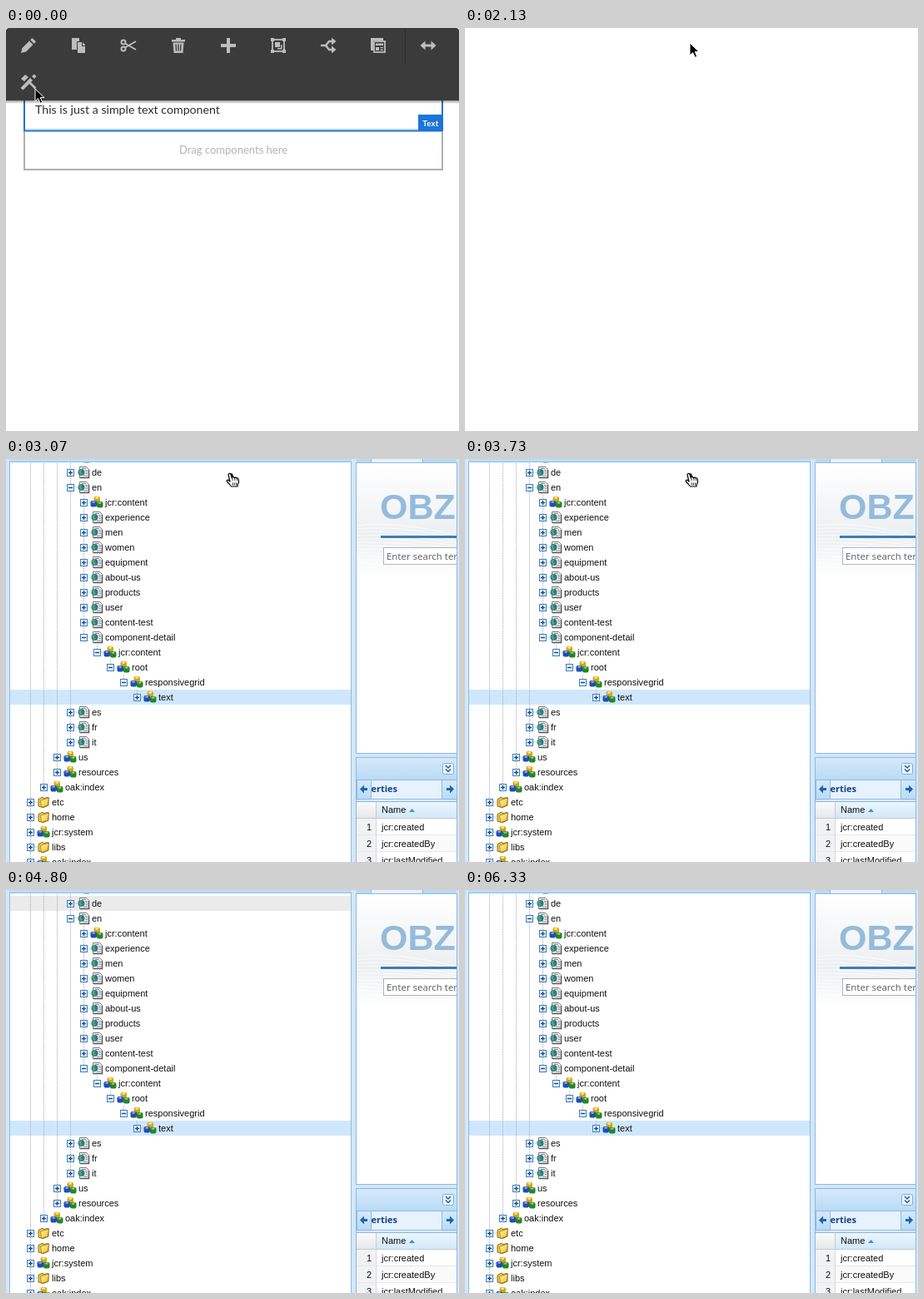
An HTML page that plays this animation: 544x484 px, repeating every 6.39 s.

```html
<!DOCTYPE html>
<html lang="en">
<head>
<meta charset="utf-8">
<title>Component to repository tree</title>
<style>
html, body { margin: 0; width: 100%; height: 100%; overflow: hidden; background: #fff; }
svg { display: block; width: 100vw; height: 100vh; }
text { font: 11px "Liberation Sans", Arial, sans-serif; fill: #111; white-space: pre; }
.page { font: 14.2px Lato, sans-serif; fill: #2c2c2c; }
.hint { font: 13px Lato, sans-serif; fill: #b3b3b3; text-anchor: middle; }
.badge { font: bold 9.5px Lato, sans-serif; fill: #fff; letter-spacing: .3px; text-anchor: middle; }
.load { font: 11.2px "Noto Sans", sans-serif; }
.brand { font: bold 43px "Liberation Sans", Arial, sans-serif; fill: #94bbdb; }
.search { font: 11.4px "Noto Sans", sans-serif; fill: #666; }
.tab { font: bold 11px "Noto Sans", sans-serif; fill: #15428b; }
.italic { font-style: italic; }
.line { fill: none; stroke: #8db9e2; }
.panel { fill: #fff; stroke: #8db9e2; }
.button { fill: url(#bar); stroke: #8db9e2; }
.dots { fill: none; stroke: #aaa; stroke-dasharray: 1 1; }
</style>
</head>
<body>
<svg viewBox="0 0 544 484" xmlns="http://www.w3.org/2000/svg">
  <defs>
    <clipPath id="treeClip"><rect x="5" y="4" width="409" height="480"/></clipPath>
    <linearGradient id="bar" x2="0" y2="1"><stop stop-color="#d6e9fa"/><stop offset="1" stop-color="#b9dbf5"/></linearGradient>
    <linearGradient id="head" x2="0" y2="1"><stop stop-color="#fafafa"/><stop offset="1" stop-color="#e6e8ea"/></linearGradient>
    <linearGradient id="sorted" x2="0" y2="1"><stop stop-color="#ecf6fe"/><stop offset="1" stop-color="#d2e8f9"/></linearGradient>
    <linearGradient id="haze" x2="0" y2="1"><stop stop-color="#fff"/><stop offset=".65" stop-color="#eceff1"/><stop offset="1" stop-color="#fff"/></linearGradient>
    <linearGradient id="shade" x2="0" y2="1"><stop stop-opacity=".4"/><stop offset="1" stop-opacity="0"/></linearGradient>
    <linearGradient id="gold" x2="1" y2="1"><stop stop-color="#fff3a4"/><stop offset="1" stop-color="#f0c02c"/></linearGradient>

    <g id="f" stroke-linejoin="round">
      <path d="M-6-3.500L-1-6 0-4.500 6-5.500V4L0 6.500-6 5z" fill="#f3cd45" stroke="#8a6a14"/>
      <path d="M-3.500-2L6.500-5 5 4 -2.500 6.500z" fill="url(#gold)" stroke="#8a6a14" stroke-width=".7"/>
    </g>
    <g id="c">
      <rect x="-3.500" y="-7" width="7.500" height="7.500" rx="2" fill="#d8a512"/>
      <path d="M-2.500-5l2-1.500h3L1-4z" fill="#fff09a"/>
      <rect x="-7.500" y="-2" width="7.500" height="7.500" rx="2" fill="#1f4fb0"/>
      <path d="M-6.500 0l2-1.500h3L-3 1z" fill="#86b5f2"/>
      <rect x="0" y="-1" width="7.500" height="7.500" rx="2" fill="#25852a"/>
      <path d="M1 1l2-1.500h3L4.500 2z" fill="#8bd67a"/>
    </g>
    <g id="p">
      <path d="M-4.500-6.500H3.500L6.500-3.500V6.500h-11z" fill="#f6f6f6" stroke="#777"/>
      <path d="M-4 6.500H6.500V-3" fill="none" stroke="#555" stroke-width="1.500"/>
      <path d="M-2-4.500h5M2-2.500h3M2.500-.500h2.500M2.500 1.500h2.500M0 4h5" stroke="#8a8a8a" fill="none"/>
      <circle cx="-2.500" cy="0" r="4" fill="#2a7796"/>
      <path d="M-5.500-1Q-4-4-2-3L-3 0-1 1-3 3.500Q-5 2-5.500-1z" fill="#54ab60"/>
    </g>
    <g id="busy"><circle r="5.500" fill="none" stroke="#9b8c76" stroke-width="3" stroke-dasharray="2.600 1.720"/></g>
    <g id="box"><rect x="-4" y="-4" width="8" height="8" fill="#e2f0fd" stroke="#3f7fbd"/><path d="M-2.500 0h5" stroke="#17457e" stroke-width="1.300"/></g>
  </defs>

  <g id="editor">
    <path d="M22 80V123.500H524V80" fill="none" stroke="#1f74cf" stroke-width="2"/>
    <path d="M23 121.500H523" stroke="#c9d3dd"/>
    <path d="M22 125V170H524V125" fill="none" stroke="#afafaf" stroke-width="2"/>
    <rect x="495" y="104" width="30" height="20" fill="#1c75d8"/>
    <text class="badge" x="510" y="117.500">Text</text>
    <text class="page" x="35" y="103">This is just a simple text component</text>
    <text class="hint" x="273" y="151">Drag components here</text>
    <rect y="87" width="544" height="4" fill="url(#shade)"/>
    <path d="M0 87V4Q0 0 4 0H540Q544 0 544 4V87z" fill="#3b3b3b"/>
    <path d="M479.500 0V43" stroke="#1c1c1c" stroke-dasharray="1 1"/>
    <g id="tools" fill="#bdbdbd" stroke="#bdbdbd" stroke-width="0"></g>
  </g>

  <g id="loading">
    <g id="spokes" stroke="#000" stroke-width="1.700" stroke-linecap="round"></g>
    <text class="load" x="257.500" y="211">Loading...</text>
  </g>

  <g id="repo">
    <rect width="544" height="484" fill="#d3e7f9"/>
    <rect x="4" width="411" height="4" fill="#bddcf5"/>
    <rect class="panel" x="4.500" y="3.500" width="410" height="490"/>
    <g clip-path="url(#treeClip)">
      <rect id="hover" x="5" width="409" height="18" fill="#ebebeb"/>
      <g id="tree"></g>
    </g>
    <path d="M421 0H438V4H421zM500 0H541V4H500z" fill="#b9d9f4"/>
    <rect x="438" width="62" height="4" fill="#e6f2fd"/>
    <rect id="sheet" class="panel" x="420.500" y="4.500" width="121"/>
    <path d="M438.500 0V4M500.500 0V4" class="line"/>
    <rect x="421" y="5" width="120" height="135" fill="url(#haze)"/>
    <path id="waves" fill="none" stroke="#fff" stroke-opacity=".7"/>
    <text class="brand" x="449" y="71.500">OBZ</text>
    <rect x="450" y="92" width="91" height="3" fill="#3c7fb6"/>
    <rect x="453.500" y="106.500" width="100" height="20" fill="#fff" stroke="#aeb3bd"/>
    <text class="search" x="457" y="121">Enter search term</text>
    <g id="props">
      <rect class="panel" x="420.500" y="5.500" width="121" height="150"/>
      <rect x="421" y="6" width="120" height="26" fill="url(#bar)"/>
      <rect x="524.500" y="12.500" width="13" height="13" rx="2" fill="#eaf5ff" stroke="#7eaedb"/>
      <path d="M528 15l3 3 3-3M528 19.500l3 3 3-3" fill="none" stroke="#1f5fa5" stroke-width="1.500"/>
      <rect x="421" y="32" width="120" height="27" fill="#d3e7f9"/>
      <rect x="438" y="33" width="85" height="24" fill="#e6f2fd"/>
      <path d="M421 32.500H541M421 55.500H541M421 58.500H541" class="line"/>
      <rect class="button" x="421.500" y="32.500" width="17" height="23"/>
      <rect class="button" x="523.500" y="32.500" width="18" height="23"/>
      <path d="M425 43.500l5-5v3.500h4v3h-4v3.500zM538 43.500l-5-5v3.500h-4v3h4v3.500z" fill="#1f64ad"/>
      <text class="tab" x="438.500" y="47">erties</text>
      <rect x="421" y="59" width="24" height="19" fill="url(#head)"/>
      <rect x="445" y="59" width="96" height="19" fill="url(#sorted)"/>
      <path d="M421 78.500H541M444.500 59V78" stroke="#c6cbd0"/>
      <text x="451" y="72">Name</text>
      <path d="M484 71l3.500-4 3.500 4z" fill="#3f8fc9"/>
      <g id="rows"></g>
    </g>
    <rect x="542" width="2" height="484" fill="#d3e7f9"/>
    <path d="M541.500 4V484" class="line"/>
  </g>

  <g id="pointer">
    <path id="arrow" d="M0 0V15L3.600 11.700 6.200 17.300 8.700 16.200 6.200 10.600H11z" stroke="#fff"/>
    <g id="hand" stroke="#000" stroke-width="1.200" stroke-linejoin="round">
      <path d="M-3 1Q-2.500-1.200-.500-.500L1.500 5Q3-.500 0 0 3 3.500 4.500 4.800 6 3.600 7.200 5 9 4.300 9.300 7L9.500 10 8 13V15H.500L-1.500 12.500-4.700 9Q-5 6.800-3 7.300L-1 9z" fill="#fff"/>
      <path d="M1.500 4.500L2.200 8M4.500 5L5 8M7.200 5.500L7.500 8M2.500 10.500v3M4.500 10.500v3M6.500 10.500v3" fill="none" stroke-width=".8"/>
    </g>
  </g>
</svg>
<script>
const $ = id => document.getElementById(id);
const LOOP = 6390, TICK = 1000 / 15, ROW = 18;

const tools = [
  '<path d="M-9 9l1.500-6L1-5.500 5.500-1-3 7.500zM2.200-6.700l2.300-2.300 4.500 4.500-2.300 2.300z"/>',
  '<path d="M-8-9H1V-5H-2V5H-8z"/><path d="M-1-4H4V1H8V9H-1zM5-4L8-1V0H5z"/>',
  '<g fill="none" stroke-width="2"><circle cx="-6" cy="-4" r="2.500"/><circle cx="-6" cy="4" r="2.500"/><path d="M-4-2.500L9 5M-4 2.500L9-5"/></g>',
  '<path d="M-3-9h6v2H8v2.500H-8V-7h5z"/><path d="M-6.500-3.500h13L5.500 9h-11z"/><path d="M-3-1.500l.5 8M0-1.500v8M3-1.500l-.5 8" stroke="#3b3b3b" stroke-width="1.300"/>',
  '<path d="M-2-9h4v7h7v4H2v7h-4V2h-7v-4h7z"/>',
  '<rect x="-7" y="-7" width="14" height="14" fill="none" stroke-width="1.800"/><path d="M-9-9h4v4h-4zM5-9h4v4h-4zM-9 5h4v4h-4zM5 5h4v4h-4zM-4-4H2V2H-4zM3-1H4.500V4.500H-1V3H3z"/>',
  '<path d="M-9 0H-3L1-5H5M-3 0L1 5H5" fill="none" stroke-width="2.500"/><path d="M4-9.500L9.500-5 4-.500zM4 .500L9.500 5 4 9.500z"/>',
  '<path d="M-9-9H6V-6H-6V6H-9z"/><rect x="-5" y="-5" width="13" height="13" fill="none" stroke-width="1.800"/><path d="M-3-2.500H6V0H-3zM-3 2H1V6H-3zM2.500 2H6V3.200H2.500zM2.500 4.800H6V6H2.500z"/>',
  '<path d="M-9.500 0l6-5.500V-1.500h7v-4L9.500 0l-6 5.500V1.500h-7V5.500z"/>'
];
const wand = '<path d="M-9.500 7L2-5 5-2-6.500 9.500z"/><path d="M-9-4L-4-9 0-6-5-1zM0 1L2-1 9.500 6.500 7.500 8.500zM4-7L7-9.500 9.500-7 7-4z"/>';
const place = (art, x, y) => `<g transform="translate(${x} ${y})">${art}</g>`;
$('tools').innerHTML = tools.map((art, i) => place(art, 27 + i * 60, 21)).join('') + place(wand, 27, 65);

$('spokes').innerHTML = Array.from({ length: 12 }, (_, i) =>
  `<path d="M0-4.300V-7.200" transform="translate(278 183) rotate(${i * 30})"/>`).join('');

$('waves').setAttribute('d', Array.from({ length: 12 }, (_, i) =>
  `M421 ${80 + i * 4}Q470 ${74 + i * 5} 541 ${92 + i * 3}`).join(''));

$('rows').innerHTML = ['jcr:created', 'jcr:createdBy', 'jcr:lastModified'].map((name, i) => {
  const y = 79 + i * 20;
  return `<rect x="421" y="${y}" width="120" height="20" fill="${i % 2 ? '#fafafa' : '#fff'}"/>
    <rect x="421" y="${y}" width="23" height="20" fill="#f1f2f4"/>
    <path d="M421 ${y + 19.5}H541" stroke="#e8e8e8"/><path d="M444.500 ${y}v20" stroke="#d4d8dc"/>
    <text x="433" y="${y + 14}">${i + 1}</text><text x="451" y="${y + 14}">${name}</text>`;
}).join('');

// depth, icon, optional * for a branch on the way to the selection, label
const nodes = `0c*/ 1fapps 1fbin 1fconf 1f*content 2crep:policy 2fdam 2fusergenerated
  2fprojects 2fcampaigns 2fphonegap 2fmobileapps 2flaunches 2fpublications 2fentities 2fforms
  2fscreens 2fcommunities 2fsites 2fcommunity-components 2fcatalogs 2fexperience-fragments
  2p*we-retail 3cjcr:content 3p*language-masters 4cjcr:content 4pde 4p*en 5cjcr:content
  5pexperience 5pmen 5pwomen 5pequipment 5pabout-us 5pproducts 5puser 5pcontent-test
  5p*component-detail 6c*jcr:content 7c*root 8c*responsivegrid 9ctext 4pes 4pfr 4pit
  3cus 3cresources 2coak:index 1fetc 1fhome 1cjcr:system 1flibs 1coak:index`
  .split(/\s+/).map(s => ({ depth: +s[0], icon: s[1], branch: s[2] === '*', name: s.slice(2).replace('*', '') }));

let order = 0;
nodes.forEach((n, i) => {
  n.rank = n.branch ? order++ : Infinity;
  // columns where a later sibling keeps the guide line running
  n.guides = Array.from({ length: n.depth + 1 }, (_, d) => {
    const next = nodes.slice(i + 1).find(m => m.depth <= d);
    return !!next && next.depth === d;
  });
});

function drawTree(open, scroll) {
  let hidden = Infinity, row = 0, out = '';
  for (const n of nodes) {
    if (n.depth > hidden) continue;
    const isOpen = n.rank < open;
    hidden = isOpen ? Infinity : n.depth;
    const x = 13 + n.depth * 16, y = 13 + row++ * ROW - scroll;
    if (y < -10 || y > 495) continue;
    if (n.name === 'text') out += `<rect x="5" y="${y - 9}" width="409" height="${ROW}" fill="#cfe7fd"/>`;
    let d = n.depth ? `M${x + .5} ${y - 9}V${y}h8` : '';
    n.guides.forEach((on, k) => { if (on) d += `M${13.5 + k * 16} ${y - 9}v${ROW}`; });
    const busy = n.name === 'we-retail' && open === 2;
    out += `<path class="dots" d="${d}"/><use href="#box" x="${x + .5}" y="${y + .5}"/>` +
      (isOpen ? '' : `<path d="M${x + .5} ${y - 2}v5" stroke="#17457e" stroke-width="1.300"/>`) +
      `<use href="#${busy ? 'busy' : n.icon}" x="${x + 16}" y="${y}"/>` +
      `<text x="${x + 26}" y="${y + 4}"${busy ? ' class="italic"' : ''}>${n.name}</text>`;
  }
  $('tree').innerHTML = out;
}

// the last scroll puts "de" at y 16
const END = nodes.findIndex(n => n.name === 'de') * ROW - 3;
// tick, open branches, scroll
const stages = [[38, 2, 0], [41, 3, 0], [42, 4, 90], [43, 5, 200], [44, 6, 320], [45, 9, END]];
// tick, x, y of the pointer tip
const path = [[0, 35, 73], [1, 35, 73], [10, 19, 68], [14, 19, 68], [19, 216, 17], [23, 270, 18],
  [57, 270, 18], [61, 300, 90], [63, 302, 92], [67, 298, 10]];

function pointerAt(tick) {
  const i = path.findIndex(k => k[0] > tick);
  if (i < 0) return path[path.length - 1].slice(1);
  const [a, ax, ay] = path[i - 1], [b, bx, by] = path[i];
  const p = (tick - a) / (b - a), e = p * p * (3 - 2 * p);
  return [ax + (bx - ax) * e, ay + (by - ay) * e];
}

const show = (id, on) => { $(id).style.display = on ? '' : 'none'; };
let lastStage, lastTick = -1;

function render(tick) {
  show('editor', tick < 11);
  show('loading', tick >= 16 && tick < 32);
  show('repo', tick >= 38);

  const lead = Math.min(tick, 23) - 16;
  [...$('spokes').children].forEach((s, i) => {
    s.style.opacity = 1 - ((lead - i + 36) % 12) / 12.5;
  });
  $('loading').style.opacity = Math.min(1, 1 - (tick - 24) / 8);

  const stage = stages.filter(s => s[0] <= tick).pop();
  if (stage && stage !== lastStage) {
    const done = stage[2] === END, bottom = done ? 353 : 397;
    drawTree(stage[1], stage[2]);
    $('props').setAttribute('transform', `translate(0 ${bottom})`);
    $('sheet').setAttribute('height', bottom - 4);
    show('rows', done);
  }
  lastStage = stage;

  const [x, y] = pointerAt(tick);
  $('pointer').setAttribute('transform', `translate(${x.toFixed(1)} ${y.toFixed(1)})`);
  show('pointer', tick < 68);
  show('arrow', tick < 38);
  show('hand', tick >= 38);

  const early = tick < 41, moving = tick >= 58 && tick < 74;
  show('hover', early || moving);
  $('hover').setAttribute('y', early ? 40 : 7 + ROW * Math.max(0, Math.floor((y - 7) / ROW)));
}

function frame(now) {
  const tick = Math.floor((now % LOOP + 4) / TICK);
  if (tick !== lastTick) render(lastTick = tick);
  requestAnimationFrame(frame);
}
render(0);
requestAnimationFrame(frame);
</script>
</body>
</html>
```
